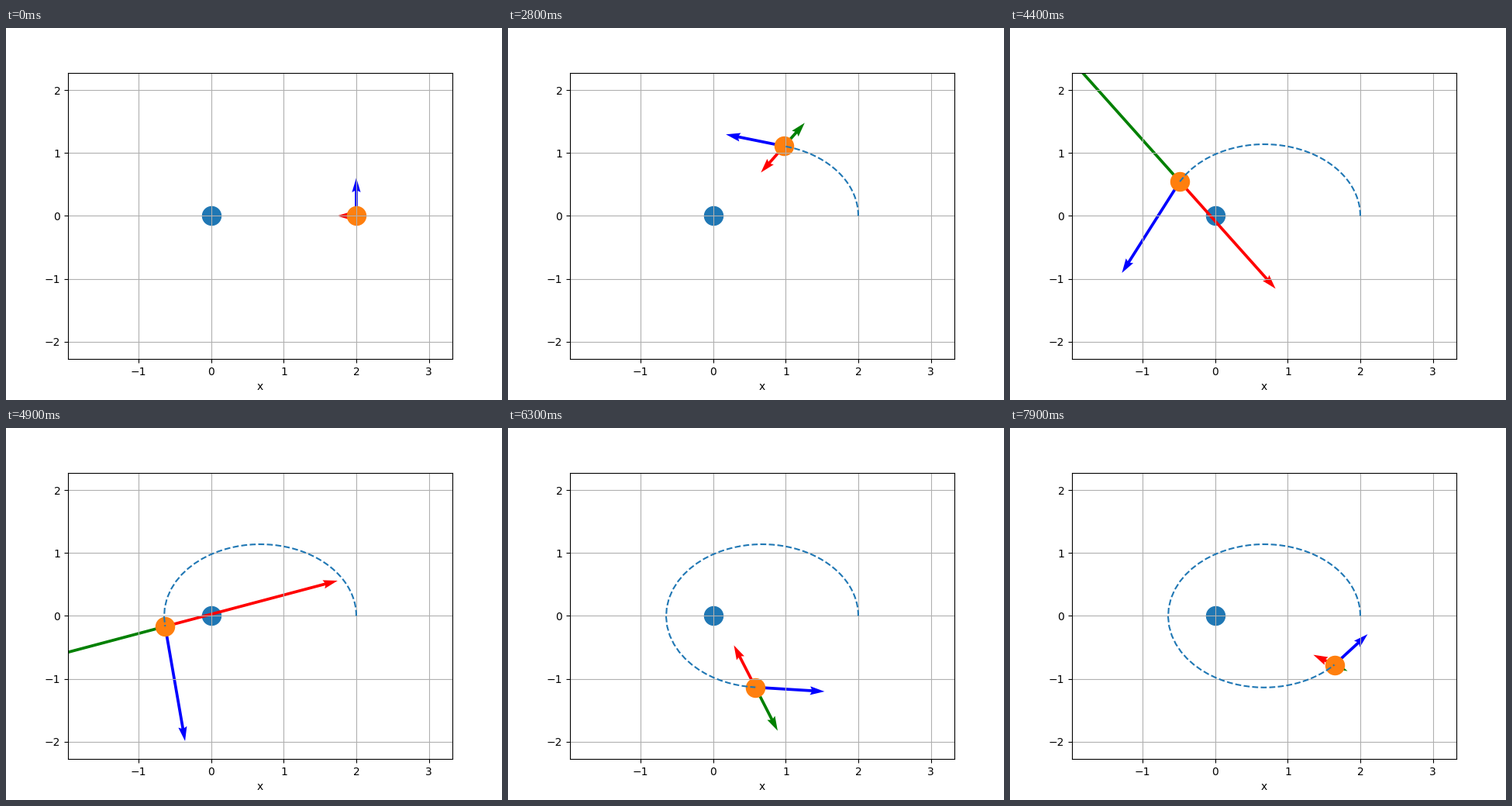
These frames come from a looping animation (640 px wide and 480 px high, 8000 ms). A matplotlib script:

```python
import numpy as np
import matplotlib.pyplot as plt
from matplotlib.animation import FuncAnimation

GM = 1.0
R0 = 2.0                        # start at the far point of the orbit
V0 = 0.7 * np.sqrt(GM / R0)
DT = 0.1
FRAMES = 80

a = 1 / (2 / R0 - V0**2 / GM)   # semi-major axis
e = R0 / a - 1
b = a * np.sqrt(1 - e**2)
rate = np.sqrt(GM / a**3)


def anomaly(t):
    """Solve Kepler's equation, with the angle counted from the far point."""
    m = rate * t
    phi = m.copy()
    for _ in range(30):
        phi -= (phi + e * np.sin(phi) - m) / (1 + e * np.cos(phi))
    return phi


phi = anomaly(np.arange(FRAMES) * DT)
pos = np.column_stack([a * e + a * np.cos(phi), b * np.sin(phi)])
r = np.hypot(*pos.T)[:, None]
vel = np.column_stack([-a * np.sin(phi), b * np.cos(phi)]) * rate * a / r
gravity = -GM * pos / r**3
centrifugal = (vel**2).sum(axis=1, keepdims=True) / r * pos / r

fig, ax = plt.subplots(figsize=(6.4, 4.8), dpi=100)
ax.scatter([0], [0], s=300, color="C0")


def arrow(vec, color):
    return ax.quiver(*pos[0], *vec[0], color=color, scale=5), vec


arrows = [
    arrow(centrifugal, "green"),
    arrow(gravity, "red"),
    arrow(vel, "blue"),
]
planet = ax.scatter(*pos[:1].T, s=300, color="C1")
trail, = ax.plot([], [], "--", color="C0")

ax.set_xlim(a * e - 2 * a, a * e + 2 * a)
ax.set_ylim(-2 * b, 2 * b)
ax.set_xlabel("x")
ax.grid()


def update(i):
    planet.set_offsets(pos[i:i + 1])
    trail.set_data(*pos[:i + 1].T)
    for quiver, vec in arrows:
        quiver.set_offsets(pos[i:i + 1])
        quiver.set_UVC(*vec[i])
    return [planet, trail] + [q for q, _ in arrows]


anim = FuncAnimation(fig, update, frames=FRAMES, interval=100,
                     repeat=True, repeat_delay=0)
plt.show()
```
